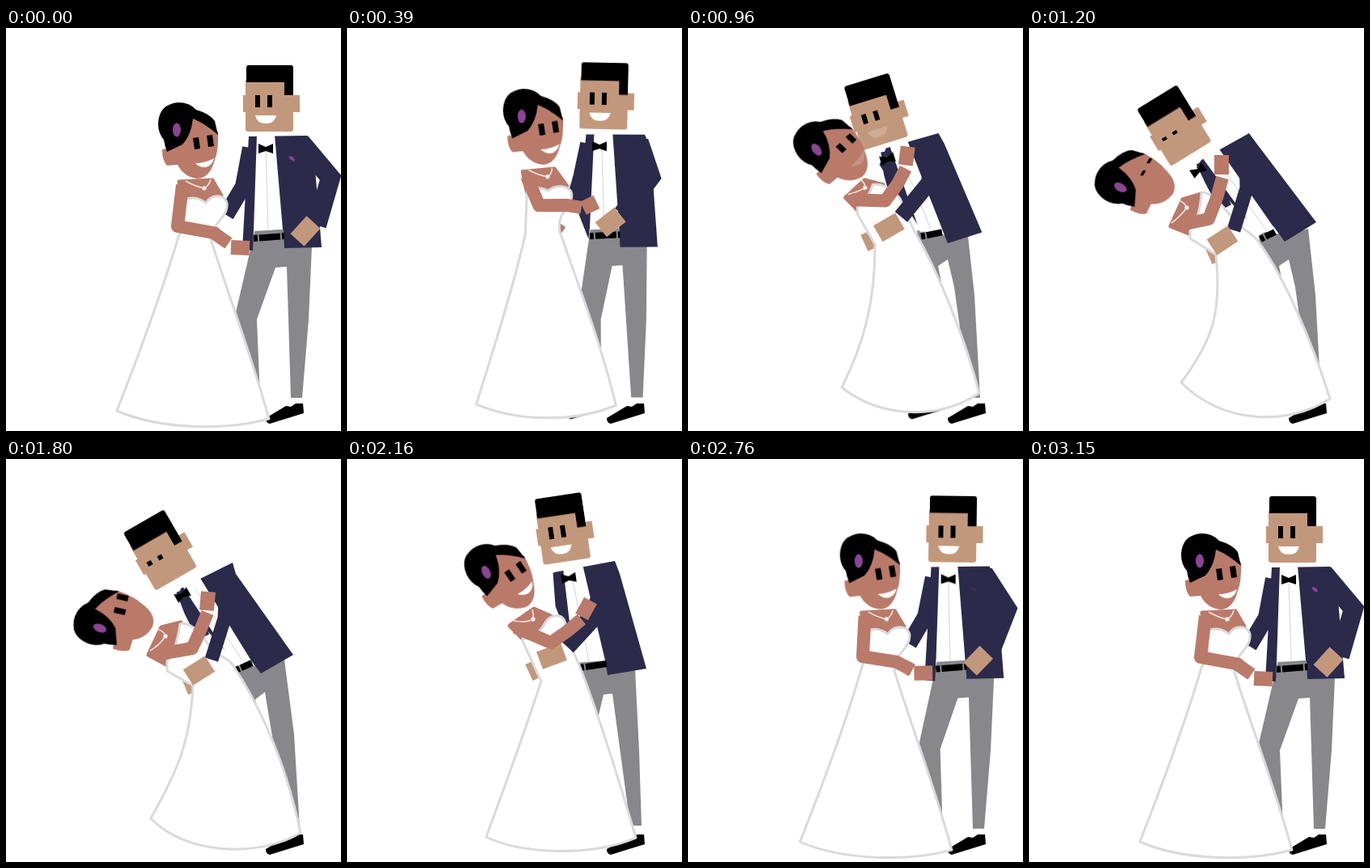
These frames come from a looping animation (414 px wide and 498 px high, 3.21 s). An HTML page without scripts:

```html
<!DOCTYPE html>
<html lang="en">
<head>
<meta charset="utf-8">
<title>Wedding dance</title>
<style>
html, body { margin: 0; width: 100%; height: 100%; overflow: hidden; background: #fff }
svg { display: block; width: 100vw; height: 100vh }
svg * { animation: 3.21s cubic-bezier(.4,.1,.6,.9) infinite }
.navy { fill: #2b2a4a }
.tan { fill: #c2987c }
.skin { fill: #b97a6a }
.grey { fill: #88878c }
.white { fill: #fff }
.plum { fill: #8a4593 }
.limb { fill: none; stroke-linejoin: round }
.limb.navy { stroke: #2b2a4a }
.limb.tan { stroke: #c2987c }
.limb.skin { stroke: #b97a6a }

#backShoe { animation-name: backShoe }
#trousers { animation-name: trousers }
#farHand { animation-name: farHand; stroke-width: 22 }
#farArm { animation-name: farArm; stroke-width: 20 }
#jacket { animation-name: jacket }
#shirt { animation-name: shirt }
#placket { animation-name: placket; fill: none; stroke: #d4d4d6 }
#belt { animation-name: belt; fill: none; stroke: #000; stroke-width: 8; stroke-dasharray: 5 2 26 2 }
#bow { animation-name: bow }
#pocket { animation-name: pocket }
#groom { animation-name: groom; transform-origin: 325.5px 87px }
#groomHair { animation-name: groomHair; transform-origin: 326px 46px }
#groomEyes { animation-name: groomEyes; transform-origin: 318px 90px }
.smile { animation-name: smile }
#herFar { animation-name: herFar; stroke-width: 14 }
#dress { animation-name: dress; fill: #fff; stroke: #dadadc; stroke-width: 3; stroke-linejoin: round }
#chest { animation-name: chest; stroke: #b97a6a; stroke-width: 5; stroke-linejoin: round }
#necklace { animation-name: necklace; fill: none; stroke: #f4e0da; stroke-width: 1.6; marker-mid: url(#gem) }
#bride { animation-name: bride; transform-origin: 211px 126px }
#brideEyes { animation-name: brideEyes; transform-origin: 244px 141px }
#nearArm { animation-name: nearArm; stroke-width: 24; stroke-linejoin: miter }
#nearHand { animation-name: nearHand; stroke-width: 23 }
#herArm { animation-name: herArm; stroke-width: 16 }
#herHand { animation-name: herHand; stroke-width: 18 }

@keyframes backShoe {
  0%, 5.6%, 37.4%, to { transform: translate(-49px,-9px) }
  20.6% { transform: translate(-49px,-1px) }
}
@keyframes trousers {
  0%, 5.6%, 88.8%, to { d: path("M308 248L343 248L378 270L374 360L366 457L352 457L347 295L333 296L310 360L314 457L300 457L282 360Z") }
  20.6% { d: path("M291 245L330 247L360 268L364 360L365 456L350 456L331 291L320 291L319 360L314 457L300 457L288 360Z") }
  37.4% { d: path("M283 250L318 256L345 248L354 330L361 457L348 457L329 320L321 286L309 294L318 340L314 457L300 457L295 340Z") }
  56.1% { d: path("M282 250L318 258L344 248L356 340L363 457L349 457L326 325L320 288L308 297L318 340L314 457L300 457L295 340Z") }
  67.3% { d: path("M284 250L325 250L356 260L361 360L364 453L350 453L328 290L317 291L309 325L314 457L300 457L290 340Z") }
  76.6% { d: path("M309 248L345 248L379 269L374 360L366 456L352 456L347 291L336 293L322 350L318 430L300 430L295 360Z") }
}
@keyframes farHand {
  0%, 5.6%, 88.8%, to { d: path("M245 280L235 285") }
  20.6% { d: path("M240 230L212 243") }
  37.4% { d: path("M245 272L222 282") }
  56.1% { d: path("M245 271L221 281") }
  67.3% { d: path("M242 256L225 264") }
  76.6% { d: path("M252 280L240 285") }
}
@keyframes farArm {
  0%, 5.6%, 88.8%, to { d: path("M302 148L293 196L272 231"); stroke-width: 20 }
  20.6% { d: path("M292 135L284 165L286 215") }
  37.4% { d: path("M214 165L226 190L243 222"); stroke-width: 16 }
  56.1% { d: path("M218 162L228 188L244 220"); stroke-width: 16 }
  67.3% { d: path("M263 140L266 180L278 210") }
  76.6% { d: path("M308 138L295 185L281 214") }
}
@keyframes jacket {
  0%, 5.6%, 88.8%, to { d: path("M300 134L372 133L380 150L390 271L344 272L343 249L306 250L305 275L292 274Z") }
  20.6% { d: path("M289 128L362 130L368 145L375 270L328 269L328 246L291 246L289 240L278 165Z") }
  37.4% { d: path("M213 163L272 130L280 141L355 240L316 264L302 245L287 255L283 250L207 172Z") }
  56.1% { d: path("M216 160L280 128L284 142L355 242L315 265L302 248L286 256L283 250L212 172Z") }
  67.3% { d: path("M256 140L331 126L337 142L370 259L322 267L319 249L281 251L279 240L262 185Z") }
  76.6% { d: path("M304 130L375 130L384 145L392 270L346 270L345 248L309 249L307 270L294 269Z") }
}
@keyframes shirt {
  0%, 5.6%, 88.8%, to { d: path("M310 132L332 132L342 249L306 251Z") }
  20.6% { d: path("M299 127L323 127L328 246L291 247Z") }
  37.4% { d: path("M214 160L234 148L303 247L284 256Z") }
  56.1% { d: path("M218 157L238 144L303 249L284 257Z") }
  67.3% { d: path("M267 135L291 130L319 249L281 252Z") }
  76.6% { d: path("M313 128L341 128L346 248L309 250Z") }
}
@keyframes placket {
  0%, 5.6%, 88.8%, to { d: path("M321 150L324 249") }
  20.6% { d: path("M306 148L309 246") }
  37.4% { d: path("M230 160L294 251") }
  56.1% { d: path("M234 160L294 252") }
  67.3% { d: path("M279 150L299 250") }
  76.6% { d: path("M326 150L325 249") }
}
@keyframes belt {
  0%, 5.6%, 88.8%, to { d: path("M306 260L344 257") }
  20.6% { d: path("M291 253L328 253") }
  37.4% { d: path("M286 261L304 252") }
  56.1% { d: path("M284 261L304 252") }
  67.3% { d: path("M288 258L321 253") }
  76.6% { d: path("M309 257L346 254") }
}
@keyframes bow {
  0%, 5.6%, 88.8%, to { transform: translate(321px,149px) rotate(0deg) }
  20.6% { transform: translate(299px,142px) rotate(2deg) }
  37.4% { transform: translate(209px,176px) rotate(-32deg) }
  56.1% { transform: translate(218px,168px) rotate(-30deg) }
  67.3% { transform: translate(274px,147px) rotate(-8deg) }
  76.6% { transform: translate(326px,145px) rotate(3deg) }
}
@keyframes pocket {
  0%, 5.6%, 88.8%, to { opacity: 1 }
  9%, 85% { opacity: 0 }
}
@keyframes groom {
  0%, 5.6%, 88.8%, to { transform: translate(0,0) rotate(0deg) }
  20.6% { transform: translate(-19.5px,-7.5px) rotate(3deg) }
  37.4%, 50% { transform: translate(-146.5px,33.5px) rotate(-31.5deg) }
  56.1% { transform: translate(-135.5px,25.5px) rotate(-30deg) }
  67.3% { transform: translate(-59.5px,-1px) rotate(-8.5deg) }
  76.6% { transform: translate(11px,-3px) rotate(5.5deg) }
}
@keyframes groomHair {
  0%, 5.6%, 88.8%, to { transform: scaleY(1) }
  20.6%, 67.3% { transform: scaleY(1.15) }
  37.4%, 56.1% { transform: scaleY(1.22) }
  76.6% { transform: scaleY(1.05) }
}
@keyframes groomEyes {
  0%, 26%, 66%, to { transform: translate(0,0) scaleY(1) }
  37.4%, 50% { transform: translate(-4px,5px) scaleY(.26) }
  56.1% { transform: translate(-4.5px,5px) scaleY(.42) }
}
@keyframes smile {
  0%, 27%, 64%, to { opacity: 1 }
  31%, 59% { opacity: 0 }
}
@keyframes herFar {
  0%, 5.6%, 88.8%, to { d: path("M250 246L272 264") }
  20.6% { d: path("M245 230L258 234") }
  37.4%, 56.1% { d: path("M245 262L258 268") }
  67.3% { d: path("M252 240L268 246") }
  76.6% { d: path("M262 246L296 250") }
}
@keyframes dress {
  0%, 5.6%, 88.8%, to { d: path("M221 212C232 207 242 212 247 216C255 204 270 206 273 216C275 230 262 238 257 248C254 254 253 258 254 264C275 330 305 410 325 483C270 498 190 496 137 473C160 415 195 320 213 258L220 245Z") }
  20.6% { d: path("M224 186C232 179 244 177 250 180C262 176 280 178 284 186C286 195 282 200 278 206C274 215 274 225 276 234C300 295 330 370 343 442C300 472 240 474 193 453C205 390 222 320 231 250L224 188Z") }
  37.4% { d: path("M199 246C206 240 212 226 213 203C225 203 235 215 246 228C252 236 258 242 265 248C272 253 278 257 282 262C318 310 352 395 372 458C320 492 240 490 188 438C228 385 238 350 231 280L199 260Z") }
  56.1% { d: path("M199 250C206 242 212 226 215 204C225 200 238 212 248 226C254 235 259 239 265 243C271 246 276 249 280 254C304 290 343 360 364 462C310 494 220 488 179 444C212 385 228 350 231 280L199 262Z") }
  67.3% { d: path("M217 222C228 224 238 214 244 204C250 192 264 190 269 200C272 212 270 222 276 232C282 242 286 252 290 262C312 320 340 410 357 468C300 492 215 488 172 467C195 405 220 335 240 275L217 225Z") }
  76.6% { d: path("M219 216C228 210 240 212 246 218C256 206 274 204 278 214C280 224 272 232 266 238C263 244 262 250 264 258C285 330 315 410 332 484C280 498 190 494 147 473C170 415 205 330 221 268L219 222Z") }
}
@keyframes chest {
  0%, 5.6%, 88.8%, to { d: path("M214 190L255 188L266 207L246 218L220 215Z") }
  20.6% { d: path("M222 160L258 154L280 178L250 184L226 186Z") }
  37.4% { d: path("M175 245L190 212L213 205L211 235L200 255Z") }
  56.1% { d: path("M176 242L192 208L216 202L211 235L200 255Z") }
  67.3% { d: path("M201 206L231 185L256 196L244 212L219 224Z") }
  76.6% { d: path("M218 190L257 187L272 207L246 218L220 215Z") }
}
@keyframes necklace {
  0%, 5.6%, 88.8%, to { d: path("M222 189Q234 196 245 198Q251 195 253 187") }
  20.6% { d: path("M228 156Q240 162 252 163Q257 159 254 152") }
  37.4% { d: path("M176 241Q188 232 195 222Q192 215 185 213") }
  56.1% { d: path("M178 237Q190 230 197 219Q195 212 188 211") }
  67.3% { d: path("M206 200Q220 203 230 198Q231 192 229 186") }
  76.6% { d: path("M226 188Q238 195 248 197Q253 192 253 186") }
}
@keyframes bride {
  0%, 5.6%, 88.8%, to { transform: translate(0,0) rotate(0deg) }
  20.6% { transform: translate(12px,-41px) rotate(-2deg) }
  37.4%, 48% { transform: translate(-98px,71px) rotate(-60deg) }
  56.1% { transform: translate(-95px,83px) rotate(-69deg) }
  67.3% { transform: translate(-39px,14px) rotate(-26deg) }
  76.6% { transform: translate(-1px,1px) rotate(-8deg) }
}
@keyframes brideEyes {
  0%, 27%, 67.3%, to { transform: translate(0,0) scaleY(1) }
  36%, 49% { transform: translate(5px,0) scaleY(.25) }
  56.1% { transform: translate(4px,-1px) scaleY(1) }
}
@keyframes nearArm {
  0%, 5.6%, 88.8%, to { d: path("M364 141L401 185L384 244"); stroke-width: 24 }
  20.6% { d: path("M356 140L338 182L278 210"); stroke-width: 24 }
  37.4% { d: path("M268 145L269 198L253 250"); stroke-width: 17 }
  56.1% { d: path("M273 143L270 197L254 248"); stroke-width: 17 }
  67.3% { d: path("M324 138L306 193L271 231"); stroke-width: 24 }
  76.6% { d: path("M373 141L352 190L303 222"); stroke-width: 24 }
}
@keyframes nearHand {
  0%, 5.6%, 88.8%, to { d: path("M380 240L360 262") }
  20.6% { d: path("M276 217L247 231") }
  37.4% { d: path("M252 254L226 271") }
  56.1% { d: path("M252 253L225 270") }
  67.3% { d: path("M268 238L238 249") }
  76.6% { d: path("M301 231L280 244") }
}
@keyframes herArm {
  0%, 5.6%, 88.8%, to { d: path("M218 194L212 245L256 253L275 266") }
  20.6% { d: path("M228 168L274 182L296 170L311 158") }
  37.4% { d: path("M184 244L222 236L232 210L239 185") }
  56.1% { d: path("M184 242L230 234L240 212L249 190") }
  67.3% { d: path("M208 208L252 227L272 213L290 198") }
  76.6% { d: path("M222 194L240 239L265 236L290 230") }
}
@keyframes herHand {
  0%, 5.6%, 88.8%, to { d: path("M278 271L301 272") }
  20.6% { d: path("M312 153L319 132") }
  37.4% { d: path("M238 181L238 157") }
  56.1% { d: path("M248 187L250 164") }
  67.3% { d: path("M290 195L301 175") }
  76.6% { d: path("M288 227L310 218") }
}
</style>
</head>
<body>
<svg viewBox="0 0 414 498">
  <defs>
    <marker id="gem" markerUnits="userSpaceOnUse" markerWidth="8" markerHeight="8" refX="4" refY="4">
      <circle cx="4" cy="4" r="2.6" fill="#f6f0ee" stroke="#d5c3be"/>
    </marker>
    <path id="shoe" d="M321 482L346 467L352 468L358 464H367L368 476L326 489Q321 488 321 482Z"/>
  </defs>

  <use id="backShoe" href="#shoe"/>
  <use href="#shoe"/>

  <!-- groom's body -->
  <path id="trousers" class="grey"/>
  <path id="farHand" class="limb tan"/>
  <path id="farArm" class="limb navy"/>
  <path id="jacket" class="navy"/>
  <path id="shirt" class="white"/>
  <path id="placket"/>
  <path id="belt"/>
  <path id="bow" d="M-9 -6L0 -2L9 -6V6L0 3L-9 6Z"/>
  <path id="pocket" class="plum" d="M349 159Q356 157 357 165L352 163Z"/>

  <g id="groom">
    <path class="tan" d="M296 64H354V83H363V104H355V125Q355 128 352 128H299Q296 128 296 125V104H293V83H296Z"/>
    <path id="groomHair" d="M297 49Q297 46 300 46H352Q355 46 355 49V83H344V67H297Z"/>
    <path id="groomEyes" d="M308 83h6v15h-6ZM323 83h6v15h-6Z"/>
    <path class="smile white" d="M308 108H334Q332 118 321 118T308 108Z"/>
  </g>

  <!-- bride -->
  <path id="herFar" class="limb skin"/>
  <path id="chest" class="skin"/>
  <path id="dress"/>
  <path id="necklace"/>
  <g id="bride">
    <path class="skin" d="M226 106L262 128Q263 150 258 163Q252 186 236 186Q220 184 212 169L199 170Q193 164 193 150L204 148Z"/>
    <path d="M213 92Q227 92 235 101Q252 106 258 115L262 132Q246 118 231 112Q229 132 218 144L199 153Q196 145 195 138Q188 130 188 118Q189 94 213 92Z"/>
    <ellipse class="plum" cx="211" cy="126" rx="5" ry="8.5"/>
    <path id="brideEyes" d="M231 136l7 -1l2 14l-7 1ZM248 133l7 -1l2 14l-7 1Z"/>
    <path class="smile white" d="M234 167Q246 167 257 161Q255 170 247 172Q239 173 234 167Z"/>
  </g>

  <path id="nearArm" class="limb navy"/>
  <path id="nearHand" class="limb tan"/>
  <path id="herArm" class="limb skin"/>
  <path id="herHand" class="limb skin"/>
</svg>
</body>
</html>
```
